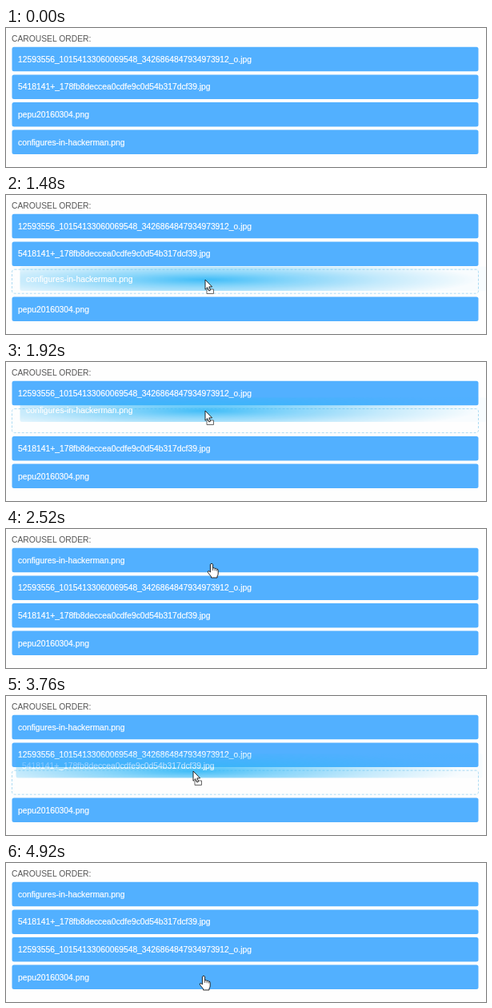
These frames come from a looping animation (600 by 174 pixels, 5000 ms). An HTML page:

```html
<!DOCTYPE html>
<html lang="en">
<head>
<meta charset="utf-8">
<title>Carousel order</title>
<style>
  html, body { margin: 0; width: 100%; height: 100%; overflow: hidden; background: #fefefe; }
  svg { display: block; width: 600px; height: 174px; }
  text { font: 10.32px "Liberation Sans", Arial, sans-serif; }
  .row rect { fill: #52b0ff; }
  .row text, .ghost text { fill: #fff; stroke: #fff; stroke-width: .2; }
  .ghost rect.face { fill: #30b7f7; }
  .gap { fill: #fefefe; stroke: #aedcf3; stroke-dasharray: 3 2; }
  .cursor { fill: #fff; stroke: #111; stroke-width: .9; stroke-linejoin: round; }
</style>
</head>
<body>
<svg viewBox="0 0 600 174">
  <defs>
    <radialGradient id="fade" gradientUnits="userSpaceOnUse" cx="0" cy="0" r="1">
      <stop offset="0" stop-color="#fff" stop-opacity=".92"/>
      <stop offset=".3" stop-color="#fff" stop-opacity=".6"/>
      <stop offset=".65" stop-color="#fff" stop-opacity=".28"/>
      <stop offset="1" stop-color="#fff" stop-opacity=".03"/>
    </radialGradient>
    <mask id="halo" maskUnits="userSpaceOnUse" x="0" y="0" width="600" height="174">
      <rect width="600" height="174" fill="url(#fade)"/>
    </mask>
  </defs>
  <text x="7" y="16.5" fill="#555">CAROUSEL ORDER:</text>
  <g id="rows"></g>
  <rect id="gap" class="gap" x="7.5" width="583" height="30" rx="3"/>
  <g id="ghost" class="ghost"><g mask="url(#halo)">
    <rect class="face" x="7.5" width="583" height="30.5" rx="2.5"/>
    <text x="15"></text>
  </g></g>
  <g id="hand" class="cursor">
    <path d="M-1.6 1.2Q0-.9 1.6 1.2V6Q3.2 5 4.2 6.5Q5.7 5.6 6.4 7.2Q8.2 6.8 8.2 9V13Q8 15 7 16V18H-.5V16.5L-4.5 11.6Q-5.4 9.2-3.2 9.6L-1.6 11Z"/>
    <path d="M1.6 6V9M4.2 6.5V9.3M6.4 7.2V9.6" fill="none" stroke-width=".7"/>
  </g>
  <g id="arrow" class="cursor">
    <rect id="badge" x="2" y="12" width="8.5" height="5.5" stroke="#555"/>
    <path d="M0 0V12.3L2.8 9.7L4.8 14L6.7 13.1L4.8 8.9H8.6Z"/>
  </g>
</svg>
<script>
const LOOP = 5000, STEP = 40;
const $ = id => document.getElementById(id);
const files = {
  A: "12593556_10154133060069548_3426864847934973912_o.jpg",
  B: "5418141+_178fb8deccea0cdfe9c0d54b317dcf39.jpg",
  C: "pepu20160304.png",
  D: "configures-in-hackerman.png"
};
// Where each dragged row starts and where it is held.
const grabs = { D: { slot: 3, x: 239, y: 144 }, B: { slot: 2, x: 229, y: 115 } };

// time, row order, dragged row, whether its slot is open
const states = [
  [0, "ABCD"], [1100, "ABCD", "D"], [1200, "ABCD", "D", true],
  [1360, "ABDC", "D", true], [1560, "ADBC", "D", true], [2000, "DABC", "D", true],
  [2280, "DABC"], [3520, "DABC", "B"], [3600, "DABC", "B", true],
  [3880, "DBAC", "B", true], [4200, "DBAC"]
];
// time, pointer x, pointer y
const path = [
  [400, 219, 177], [600, 232, 153], [680, 232, 152], [920, 239, 144], [1100, 239, 144],
  [1160, 243, 140], [1480, 249, 106], [1600, 250, 86], [1920, 249, 61], [2080, 251, 48],
  [2280, 253, 43], [2520, 257, 43], [2760, 257, 43], [3240, 229, 115], [3520, 229, 115],
  [3760, 234, 94], [3920, 238, 76], [4160, 240, 70], [4400, 240, 72], [4920, 247, 141]
];

const slotY = i => 23.8 + i * 34.6;
const show = (el, on) => el.style.display = on ? "" : "none";
const move = (el, x, y) => el.setAttribute("transform", `translate(${x} ${y})`);

$("rows").innerHTML = Object.entries(files).map(([key, name]) =>
  `<g class="row" id="row${key}"><rect x="7.5" width="583" height="30.5" rx="2.5"/>
   <text x="15" y="19">${name}</text></g>`).join("");

function pointerAt(t) {
  const next = path.findIndex(p => p[0] > t);
  if (next === 0) return [-50, 220];
  if (next < 0) return path.at(-1).slice(1);
  const [t0, x0, y0] = path[next - 1], [t1, x1, y1] = path[next];
  const k = (t - t0) / (t1 - t0);
  return [x0 + (x1 - x0) * k, y0 + (y1 - y0) * k];
}

function drawGhost(key, x, y) {
  show($("ghost"), key);
  if (!key) return;
  const { slot, x: gx, y: gy } = grabs[key], top = slotY(slot);
  const label = $("ghost").querySelector("text");
  label.textContent = files[key];
  label.setAttribute("y", top + 19);
  $("ghost").querySelector(".face").setAttribute("y", top);
  $("fade").setAttribute("gradientTransform", `translate(${gx} ${gy}) scale(340 26)`);
  move($("ghost"), x - gx, y - gy);
}

function draw(now) {
  const t = Math.floor(now % LOOP / STEP) * STEP;
  const [, order, dragged, open] = states.findLast(s => s[0] <= t);
  const [x, y] = pointerAt(t);
  [...order].forEach((key, i) => {
    move($("row" + key), 0, slotY(i));
    show($("row" + key), !(open && key === dragged));
  });
  show($("gap"), open);
  if (open) $("gap").setAttribute("y", slotY(order.indexOf(dragged)) + .2);
  drawGhost(dragged, x, y);

  const overRow = [0, 1, 2, 3].some(i => y >= slotY(i) && y <= slotY(i) + 30.5);
  const arrow = dragged || !overRow;
  show($("arrow"), arrow);
  show($("hand"), !arrow);
  show($("badge"), dragged);
  move($(arrow ? "arrow" : "hand"), x, y);
}

const start = performance.now();
function tick() {
  draw(performance.now() - start);
  requestAnimationFrame(tick);
}
tick();
</script>
</body>
</html>
```
